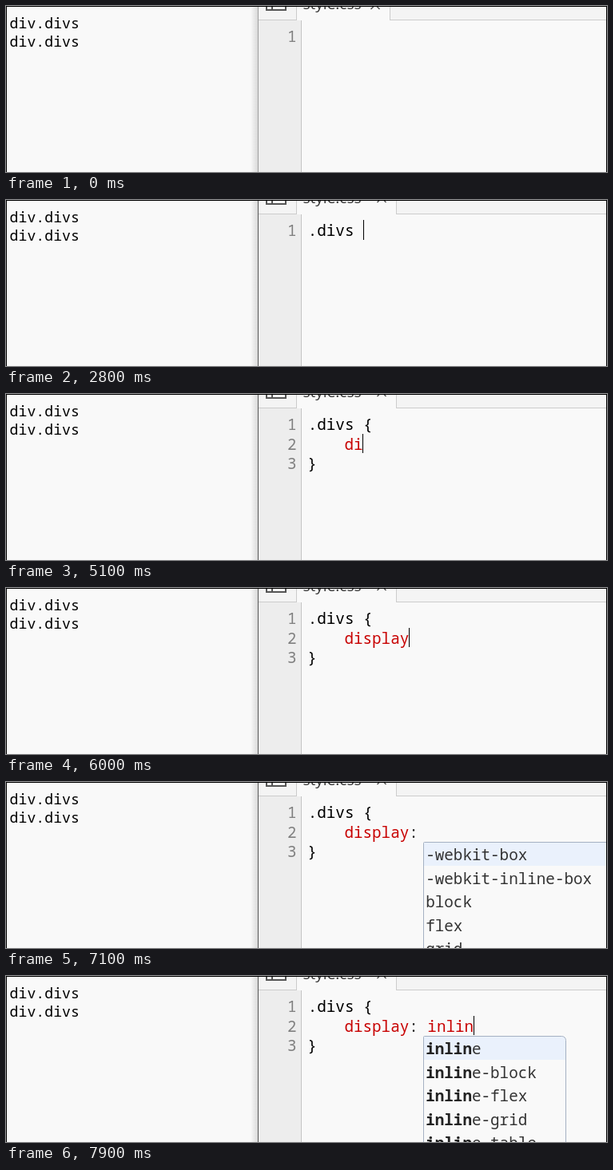
Animation, 752 px wide and 208 px high, one loop 8000 ms. Source, as an HTML page with a canvas:

```html
<!DOCTYPE html>
<html lang="en">
<head>
<meta charset="utf-8">
<title>Typing a CSS rule</title>
<style>
  html, body { margin: 0; width: 100%; height: 100%; overflow: hidden; background: #f9f9f9; }
  canvas { display: block; width: 752px; height: 208px; }
</style>
</head>
<body>
<canvas id="stage" width="752" height="208"></canvas>
<script>
const ctx = document.getElementById('stage').getContext('2d');
const LOOP = 8000;
const W = 752, H = 208;
const ADV = 11.55, LINE = 24.5, ROW = 29.5;
const MONO = '"Noto Sans Mono", "DejaVu Sans Mono", monospace';
const CODE = '19.25px ' + MONO;
const BG = '#f9f9f9', RED = '#c80000';

const selector = { text: '.divs ', keys: [1800, 2100, 2200, 2300, 2500, 2800] };
const rule = {
  text: 'display: inlin',
  keys: [5100, 5100, 5400, 5500, 5700, 5800, 6000, 6500, 6700, 7400, 7500, 7700, 7800, 7900]
};
const BRACES = 3300, ENTER = 3500, HINTS = 6600;
const caretOff = [[0, 500], [1000, 1500], [3900, 4400], [4900, 5100], [7100, 7400]];

const anyValue = ['-webkit-box', '-webkit-inline-box', 'block', 'flex', 'grid'];
const iValues = ['inherit', 'initial', 'inline', 'inline-block', 'inline-flex'];
const inlineValues = ['inline', 'inline-block', 'inline-flex', 'inline-grid', 'inline-table'];

const typed = (part, t) => part.text.slice(0, part.keys.filter(k => k <= t).length);
const column = (n, line) => 377.7 - 0.5 * line + n * ADV;
const baseline = line => 45 + line * LINE;

function box(x, y, w, h, color) {
  ctx.fillStyle = color;
  ctx.fillRect(x, y, w, h);
}

function write(str, x, y, color, font = CODE) {
  ctx.font = font;
  ctx.fillStyle = color;
  ctx.fillText(str, x, y);
}

function stroke(points, color, width) {
  ctx.strokeStyle = color;
  ctx.lineWidth = width;
  ctx.beginPath();
  points.forEach(([x, y], i) => i ? ctx.lineTo(x, y) : ctx.moveTo(x, y));
  ctx.stroke();
}

function drawOutline(focused) {
  const font = '18.2px ' + MONO;
  write('div.divs', 4.6, 28, '#000', font);
  write('div.divs', 4.6, 51, '#000', font);
  const shade = ctx.createLinearGradient(306, 0, 315, 0);
  shade.addColorStop(0, 'rgba(0,0,0,0)');
  shade.addColorStop(1, 'rgba(0,0,0,0.13)');
  box(306, 1, 9, H, shade);
  box(315, 1, 1, H, focused ? '#5a5a5a' : '#a0a0a0');
}

function drawTabs(edited) {
  const right = edited ? 488 : 480;
  box(316, 1, 435, 16, '#f4f4f4');
  box(316, 17, 435, 1, '#cccccc');
  box(363, 1, right - 363, 17, BG);
  box(363, 1, 1, 17, '#cccccc');
  box(right, 1, 1, 17, '#cccccc');
  stroke([[326, 0], [326, 5], [350, 5], [350, 0]], '#555', 2);
  stroke([[333, 0], [333, 5]], '#555', 2);
  write('style.css', 371.5, 4, '#333', '19px "Open Sans", "Noto Sans", sans-serif');
  const x = right - 18, y = edited ? -2.5 : -1.5;
  stroke([[x - 5.5, y + 5.5], [x, y], [x + 5.5, y + 5.5]], '#555', 1.5);
}

function drawGutter(lines) {
  box(316, 18, 53, H, '#ededed');
  box(369, 18, 1, H, '#c4c4c4');
  for (let i = 0; i < lines; i++) write(String(i + 1), 352, baseline(i), '#808080');
}

function drawCode(t, value) {
  const head = typed(selector, t);
  const open = t >= ENTER;
  write(head + (open ? '{' : t >= BRACES ? '{}' : ''), column(0, 0), baseline(0), '#000');
  if (open) {
    write(value.slice(0, 7), column(4, 1), baseline(1), RED);
    write(value.slice(7, 8), column(11, 1), baseline(1), '#222');
    write(value.slice(9), column(13, 1), baseline(1), RED);
    write('}', column(0, 1), baseline(2), '#000');
  }
  if (caretOff.some(([a, b]) => t >= a && t < b)) return;
  if (open) box(Math.floor(column(4 + value.length, 1)), 50, 1, 24, '#000');
  else box(Math.floor(column(head.length + (t >= BRACES), 0)), 25, 1, 25, '#000');
}

function drawScrollbar() {
  box(702, 77, 15, H, '#f1f1f1');
  box(703.5, 94, 11, 84, '#c1c1c1');
  ctx.fillStyle = '#8a8a8a';
  ctx.beginPath();
  ctx.moveTo(704.5, 88);
  ctx.lineTo(709, 83);
  ctx.lineTo(713.5, 88);
  ctx.fill();
}

function drawHints(value) {
  const match = value.slice(9);
  const x = value.length > 8 ? 522 : 511;
  const right = match.length > 2 ? 701 : match ? 718 : 780;
  const items = match.length > 2 ? inlineValues : match ? iValues : anyValue;
  ctx.save();
  ctx.beginPath();
  ctx.roundRect(x + 0.5, 75.5, right - x - 1, 200, [1, 5, 0, 0]);
  ctx.fillStyle = BG;
  ctx.fill();
  ctx.save();
  ctx.clip();
  box(x + 1, 76, right - x - 2, 29, '#eaf1fc');
  if (match && match.length < 3) drawScrollbar();
  ctx.restore();
  ctx.strokeStyle = '#a5b1c2';
  ctx.lineWidth = 1;
  ctx.stroke();
  ctx.restore();
  items.forEach((item, i) => {
    const left = x + 3.2, y = 98 + i * ROW;
    write(match, left, y, '#222', 'bold ' + CODE);
    write(item.slice(match.length), left + match.length * ADV, y, '#333');
  });
}

function draw(t) {
  const value = typed(rule, t);
  box(0, 0, W, H, BG);
  drawOutline(t >= 500);
  drawTabs(t >= 1800);
  drawGutter(t >= ENTER ? 3 : 1);
  drawCode(t, value);
  if (t >= HINTS) drawHints(value);
  box(0, 0, W, 1, '#000');
  box(0, 0, 1, H, '#000');
  box(W - 1, 0, 1, H, '#000');
}

const start = performance.now();
function tick() {
  draw((performance.now() - start) % LOOP);
  requestAnimationFrame(tick);
}
tick();
</script>
</body>
</html>
```
